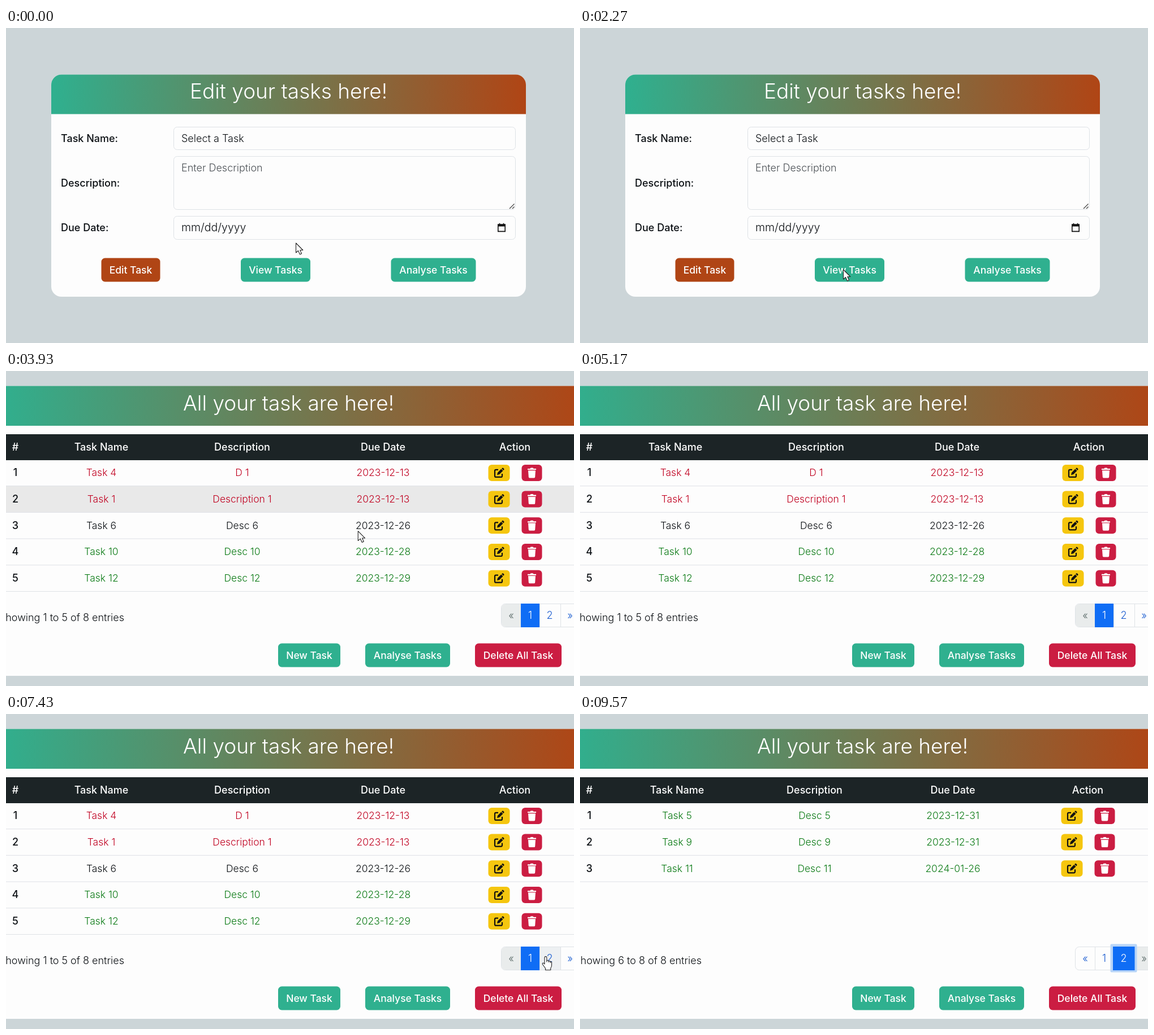
Animation, 1004 px wide and 558 px high, one loop 9.61 s. Source, as an HTML page:

```html
<!DOCTYPE html>
<html lang="en">
<head>
<meta charset="utf-8">
<title>Task manager</title>
<style>
html, body { margin: 0; width: 100%; height: 100%; overflow: hidden; background: #ccd5d8; }
svg { display: block; width: 1004px; height: 558px; }
text { font: 300 18px Inter, "Open Sans", sans-serif; fill: #0c1014; }
.mid { text-anchor: middle; }
.end { text-anchor: end; }
.title { font-size: 37px; fill: #fff; }
.bold { font-weight: 500; }
.cell { font-size: 17.5px; }
.date { font-size: 19.5px; }
.hint { fill: #4a4f54; }
.button { font-size: 17.5px; font-weight: 500; }
.white, .button { fill: #fff; }
.link { fill: #1a5cd0; }
.muted { fill: #5a6a68; }
.field { fill: #fdfdfd; stroke: #dee2e6; }
</style>
</head>
<body>
<svg id="stage" viewBox="0 0 1004 558"></svg>
<script>
const LOOP = 9610, OPEN_LIST = 2650, OPEN_PAGE_2 = 8100, HOVER_DELAY = 140;
const ROW_TOP = 157, ROW_HEIGHT = 46.7;
const GREEN = '#2fb08f', RUST = '#b04515', RED = '#cb1d42', YELLOW = '#f5c60f', BLUE = '#0f6df5';
const LATE = '#c00020', TODAY = '#0c1014', AHEAD = '#0a7a14';

const text = (x, y, content, classes = '', style = '') =>
  `<text x="${x}" y="${y}" class="${classes}" style="${style}">${content}</text>`;
const box = (x, y, w, h, fill, r = 0, extra = '') =>
  `<rect x="${x}" y="${y}" width="${w}" height="${h}" rx="${r}" fill="${fill}" ${extra}/>`;
const field = (y, h) => `<rect x="296.5" y="${y}" width="604" height="${h}" rx="6" class="field"/>`;
const button = (x, y, w, label, fill) =>
  box(x, y, w, 42, fill, 6.5) + text(x + w / 2, y + 27, label, 'mid button');
const group = (id, content) => `<g id="${id}">${content}</g>`;

function formScreen() {
  return box(80, 82.5, 839, 393.5, '#fdfdfd', 18) +
    '<path d="M80 152.5V100.5a18 18 0 0 1 18-18H901a18 18 0 0 1 18 18V152.5Z" fill="url(#banner)"/>' +
    text(499.5, 125, 'Edit your tasks here!', 'mid title') +
    field(175.5, 40) + field(227.5, 94) + field(333.5, 41) +
    text(97, 201.5, 'Task Name:', 'bold') + text(310, 201.5, 'Select a Task') +
    text(97, 280.5, 'Description:', 'bold') + text(310, 254, 'Enter Description', 'hint') +
    text(97, 360, 'Due Date:', 'bold') + text(310, 360, 'mm/dd/yyyy', 'date') +
    '<path d="M890 320l8.5-8.5M895 320l3.5-3.5" stroke="#444" stroke-width="1.2"/>' +
    '<path d="M869.8 348.2h12.4v12.2h-12.4zM872.5 345.8v2M879.5 345.8v2" fill="none" stroke="#111" stroke-width="1.6"/>' +
    box(869, 347.5, 14, 4, '#111') +
    button(168.5, 407.5, 104, 'Edit Task', RUST) +
    button(415, 407.5, 123, 'View Tasks', GREEN) +
    button(680.5, 407.5, 150, 'Analyse Tasks', GREEN);
}

function listScreen() {
  return box(-20, 26.5, 1040, 513.5, '#fdfdfd') + box(-20, 26.5, 1040, 70.5, 'url(#banner)') +
    text(499.5, 70, 'All your task are here!', 'mid title') +
    box(0, ROW_TOP, 1004, ROW_HEIGHT, '#e9e9e9', 0, 'id="rowHover"') +
    box(0, 112, 1004, 46, '#1c2426') +
    button(481, 482.5, 110, 'New Task', GREEN) +
    button(635, 482.5, 150, 'Analyse Tasks', GREEN) +
    button(829, 482.5, 153, 'Delete All Task', RED);
}

function actions(x, y) {
  return box(x - 47, y - 14.5, 38, 29, YELLOW, 6) + box(x + 12, y - 14.5, 36, 29, RED, 6) +
    `<g transform="translate(${x - 28} ${y})">
      <path d="M-1.5 -5.5H-5.5a2 2 0 0 0-2 2V5.5a2 2 0 0 0 2 2H3.5a2 2 0 0 0 2-2V1.5" fill="none" stroke="#111" stroke-width="2.2"/>
      <path d="M-3.5 3.8L-2.5 -.5L3.8 -6.8L7 -3.6L.7 2.7ZM4.6 -7.6L5.8 -8.7Q6.6 -9.3 7.4 -8.6L8.8 -7.2Q9.4 -6.4 8.8 -5.6L7.8 -4.4Z" fill="#111"/>
    </g>
    <path transform="translate(${x + 30} ${y})" d="M-7.5 -7.5H-3L-2 -9H2L3 -7.5H7.5V-5.3H-7.5ZM-6.5 -4.2H6.5L5.7 7.3Q5.6 9 4 9H-4Q-5.6 9 -5.7 7.3Z" fill="#fff"/>`;
}

function table(columns, rows) {
  const headings = ['Task Name', 'Description', 'Due Date', 'Action'];
  return text(16.5, 141, '#', 'mid bold white') +
    headings.map((name, i) => text(columns[i], 141, name, 'mid bold white')).join('') +
    rows.map(([color, ...cells], i) => {
      const top = ROW_TOP + i * ROW_HEIGHT, baseline = top + 29.3;
      return box(0, top + ROW_HEIGHT - .5, 1004, 1, '#dee2e6') +
        text(16.5, baseline, i + 1, 'mid bold') +
        cells.map((cell, j) => text(columns[j], baseline, cell, 'mid cell', `fill:${color}`)).join('') +
        actions(columns[3], top + 23.4);
    }).join('');
}

function pager(page) {
  const first = page === 1;
  const frame = 'M1004 412.5H882.5a7 7 0 0 0-7 7V446.5a7 7 0 0 0 7 7H1004';
  const active = first
    ? box(910, 412, 33, 42, BLUE)
    : box(937.5, 407.5, 47, 50, '#b8d5f8', 2) + box(942, 412, 38.5, 42, BLUE);
  return `<path d="${frame}" fill="#fdfdfd" stroke="#dee2e6"/>` +
    (first
      ? '<path d="M910 413H882.5a6.5 6.5 0 0 0-6.5 6.5V446.5a6.5 6.5 0 0 0 6.5 6.5H910Z" fill="#e9ecec"/>' +
        box(943, 413, 37, 40, '#edf0f2', 0, 'id="linkHover"')
      : box(980, 413, 24, 40, '#e9ecec')) +
    '<path d="M910.5 413v40M943.5 413v40M980.5 413v40" stroke="#dee2e6"/>' + active +
    text(893, 439, '«', `mid ${first ? 'muted' : 'link'}`) +
    text(926.5, 439, '1', `mid ${first ? 'white' : 'link'}`) +
    text(961, 439, '2', `mid ${first ? 'link' : 'white'}`) +
    text(997, 439, '»', `mid ${first ? 'link' : 'muted'}`);
}

const page1 = table([168.5, 417.5, 666.5, 899.5], [
  [LATE, 'Task 4', 'D 1', '2023-12-13'],
  [LATE, 'Task 1', 'Description 1', '2023-12-13'],
  [TODAY, 'Task 6', 'Desc 6', '2023-12-26'],
  [AHEAD, 'Task 10', 'Desc 10', '2023-12-28'],
  [AHEAD, 'Task 12', 'Desc 12', '2023-12-29']
]) + pager(1) + text(209, 443, 'Showing 1 to 5 of 8 entries', 'end');

const page2 = table([171.5, 414.5, 659, 897.5], [
  [AHEAD, 'Task 5', 'Desc 5', '2023-12-31'],
  [AHEAD, 'Task 9', 'Desc 9', '2023-12-31'],
  [AHEAD, 'Task 11', 'Desc 11', '2024-01-26']
]) + pager(2) + text(215, 443, 'Showing 6 to 8 of 8 entries', 'end');

const cursor =
  '<path id="arrow" d="M0 0V17L4 13.5L7 20L10 18.7L7.3 12.5H12.3Z"/>' +
  '<path id="hand" d="M-2 13V1.5a1.9 1.9 0 0 1 3.8 0V9V7.5a1.7 1.7 0 0 1 3.3 0V9.5V8.5a1.6 1.6 0 0 1 3 0V10.5V9.5a1.5 1.5 0 0 1 2.4 0V15Q10.5 18 8.7 20V23.5H-.5V20.5L-5.5 13.5Q-6.3 11.5 -4.8 11Q-3.5 10.8 -2 13Z"/>';

document.getElementById('stage').innerHTML =
  `<defs><linearGradient id="banner"><stop stop-color="${GREEN}"/><stop offset="1" stop-color="${RUST}"/></linearGradient></defs>` +
  box(0, 0, 1004, 558, '#ccd5d8') + group('form', formScreen()) +
  group('list', listScreen() + group('page1', page1) + group('page2', page2)) +
  `<g id="cursor" fill="#fff" stroke="#222" stroke-width="1.1" stroke-linejoin="round">${cursor}</g>`;

// Pointer stops: time, x, y
const stops = [
  [0, 512.5, 381], [700, 512.5, 381], [1700, 465.5, 428], [2650, 465.5, 428],
  [3130, 458.5, 187], [3500, 458.5, 187], [4700, 1015, 515], [6100, 1015, 470],
  [6370, 957, 428], [7000, 957, 428], [7300, 954, 430], [8300, 954, 430],
  [8900, 1015, 505], [LOOP, 1015, 505]
];

function pointerAt(t) {
  const next = Math.max(1, stops.findIndex(stop => stop[0] >= t));
  const [t0, x0, y0] = stops[next - 1], [t1, x1, y1] = stops[next];
  const p = (t - t0) / (t1 - t0), eased = p * p * (3 - 2 * p);
  return { x: x0 + (x1 - x0) * eased, y: y0 + (y1 - y0) * eased };
}

const el = id => document.getElementById(id);
const show = (id, visible) => el(id).setAttribute('display', visible ? 'inline' : 'none');
const overPager = ({ x, y }) => x > 943 && y > 412 && y < 454;

function render(t) {
  const pointer = pointerAt(t), settled = pointerAt(Math.max(0, t - HOVER_DELAY));
  const onList = t >= OPEN_LIST, onPage2 = t >= OPEN_PAGE_2;
  const row = Math.floor((settled.y - ROW_TOP) / ROW_HEIGHT);
  const hand = onList && overPager(pointer);
  show('form', !onList);
  show('list', onList);
  show('page1', !onPage2);
  show('page2', onPage2);
  show('rowHover', settled.x < 1004 && row >= 0 && row < 5);
  el('rowHover').setAttribute('y', ROW_TOP + row * ROW_HEIGHT);
  show('linkHover', overPager(settled) && settled.x < 980);
  show('arrow', !hand);
  show('hand', hand);
  el('cursor').setAttribute('transform', `translate(${pointer.x} ${pointer.y})`);
}

function tick() {
  render(performance.now() % LOOP);
  requestAnimationFrame(tick);
}
tick();
</script>
</body>
</html>
```
